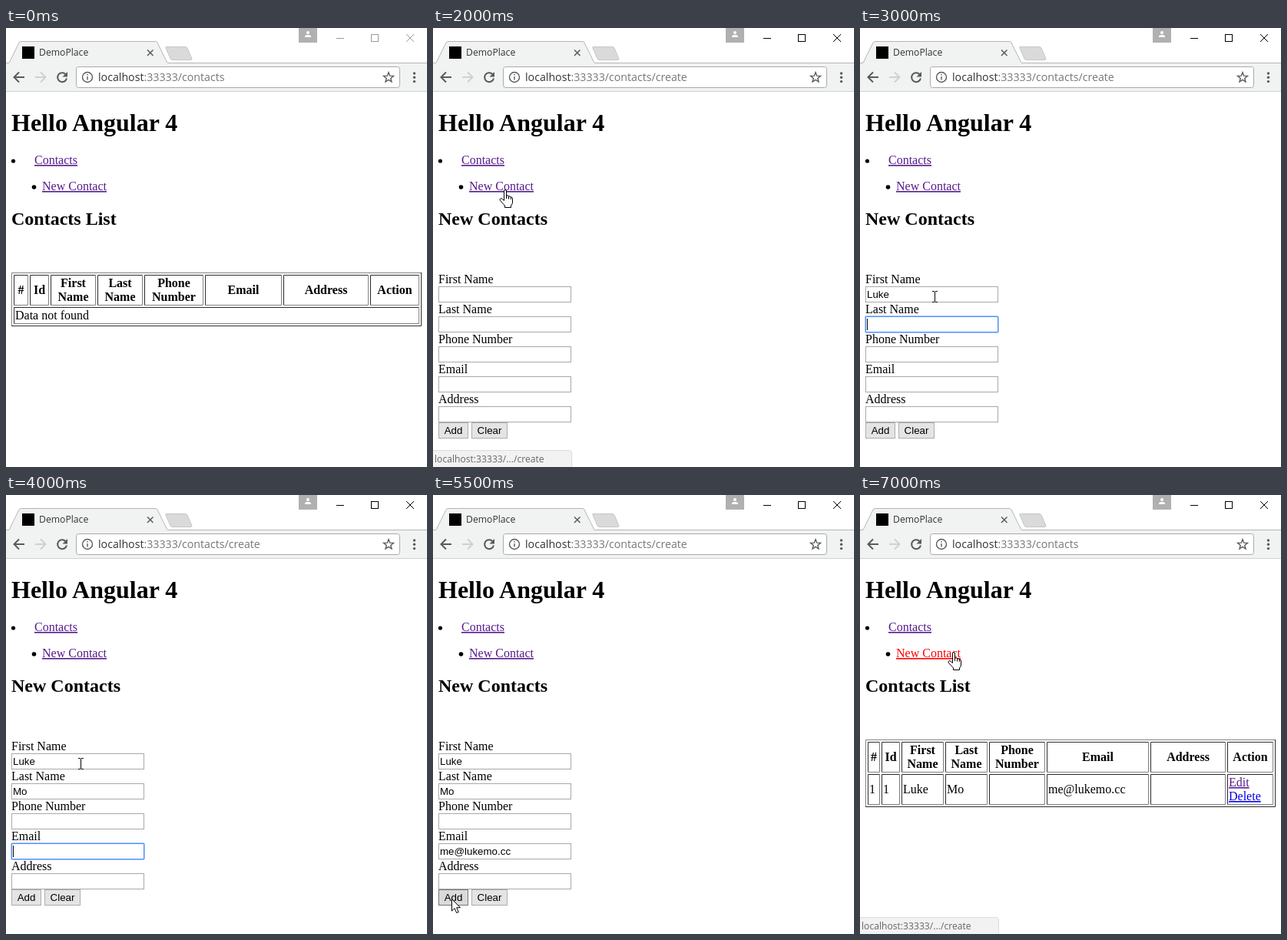
Recreate the animation shown at these times as an HTML page. Size 548 px wide and 571 px high, loop 8000 ms.

```html
<!DOCTYPE html>
<html lang="en">
<head>
<meta charset="utf-8">
<title>Contacts</title>
<style>
  html, body { margin: 0; width: 100%; height: 100%; overflow: hidden; background: #fff; }
  svg { display: block; }
  text { font: 16px "Liberation Serif", serif; white-space: pre; }
  .b { font-weight: bold; }
  .mid { text-anchor: middle; }
  .h1 { font-size: 32px; }
  .h2 { font-size: 24px; }
  .ui { font: 13.33px "Liberation Sans", sans-serif; }
  .bar { font: 14.2px "Open Sans", sans-serif; }
  .tab { font-size: 12.2px; }
  .link { text-decoration: underline; }
</style>
</head>
<body>
<svg id="stage" width="548" height="571" viewBox="0 0 548 571"></svg>
<script>
const VISITED = '#551a8b';
const COLS = ['#', 'Id', 'First Name', 'Last Name', 'Phone Number', 'Email', 'Address', 'Action'];
const LABELS = COLS.slice(2, 7);
const VALUES = ['Luke', 'Mo', '', 'me@lukemo.cc', ''];
const EMPTY_EDGES = [10, 31, 58, 119, 180, 259, 361, 474, 540];
const FILLED_EDGES = [10, 28, 54, 111, 168, 243, 378, 478, 540];
const STEPS = [0, 1000, 2000, 2500, 3000, 3500, 4000, 4500, 5000, 5500, 6000, 7000];
const LOOP = 8000;

const text = (x, y, s, cls = '', fill = '#000') =>
  `<text x="${x}" y="${y}" class="${cls}" fill="${fill}">${s}</text>`;
const rect = (x, y, w, h, fill, extra = '') =>
  `<rect x="${x}" y="${y}" width="${w}" height="${h}" fill="${fill}" ${extra}/>`;
const path = (d, stroke, width = 1, fill = 'none', extra = '') =>
  `<path d="${d}" stroke="${stroke}" stroke-width="${width}" fill="${fill}" ${extra}/>`;
const circle = (x, y, r, fill) => `<circle cx="${x}" cy="${y}" r="${r}" fill="${fill}"/>`;
const frame = (x, y, w, h, stroke, fill = 'none', r = 0) =>
  rect(x + .5, y + .5, w - 1, h - 1, fill, `stroke="${stroke}" rx="${r}"`);

// One-pixel box with different top-left and bottom-right edges
function bevel(x, y, r, b, light, dark) {
  return path(`M${x + .5} ${b}V${y + .5}H${r}`, light) +
         path(`M${r - .5} ${y}V${b - .5}H${x}`, dark);
}
const cell = (x, y, r, b) => bevel(x, y, r, b, '#2c2c2c', '#808080');

function star(cx, cy) {
  const pts = Array.from({ length: 10 }, (_, i) => {
    const a = i * Math.PI / 5, r = i % 2 ? 2.9 : 6.8;
    return [cx + r * Math.sin(a), cy - r * Math.cos(a)].map(v => v.toFixed(2)).join(' ');
  });
  return path(`M${pts.join('L')}Z`, '#5a5a5a', 1.4);
}

function browser(active, url, canForward) {
  const ctl = active ? '#000' : '#999';
  const icon = '#5a5a5a';
  return rect(0, 0, 548, 571, '#fff') +
    rect(381, 0, 24, 19, '#b0b0b0') + circle(393, 6, 2, '#fff') +
    path('M389 12v-1q0-2 4-2t4 2v1Z', 'none', 0, '#fff') +
    path('M430 13.5H440', ctl) + frame(475, 8, 10, 10, ctl) +
    path('M521 8L531 18M531 8L521 18', ctl) +
    rect(0, 46, 548, 36, '#f1f2f2') +
    path('M0 45.5H4L17 19Q18 17.5 20 17.5H194Q196 17.5 197 19L210 45.5H548', '#b4b6b6', 1, '#f1f2f2') +
    path('M5 46H210', '#f1f2f2', 2) +
    path('M0 82.5H548', '#cfd1d1') +
    path('M209 24.5H233Q235 24.5 236 26L242 40Q242 41.5 240 41.5H217Q215 41.5 214 40L208 26Q207 24.5 209 24.5Z', '#c6c6c6', 1, '#dadada') +
    rect(21, 24, 16, 16, '#000') +
    text(43, 36, 'DemoPlace', 'bar tab', '#333') +
    path('M184 28.5L191.5 36M191.5 28.5L184 36', icon, 1.5) +
    path('M24 64H11M17 57.5L10.5 64L17 70.5', icon, 2) +
    path('M38 64H51M45 57.5L51.5 64L45 70.5', '#d0d0d0', 2) +
    path('M77.5 60A6 6 0 1 0 79 65.5', icon, 2) +
    path('M80 57V63.5H73.5Z', 'none', 0, icon) +
    frame(91, 50, 422, 28, '#a9abab', '#fff', 3) +
    path('M99.5 64a6.5 6.5 0 1 0 13 0a6.5 6.5 0 1 0-13 0M106 63v4.5M106 60v1.6', icon, 1.4) +
    text(120, 69, `localhost<tspan fill="#777">:33333${url}</tspan>`, 'bar', '#333') +
    star(498, 64.5) +
    [59, 64.3, 69.6].map(y => circle(531.5, y, 1.7, icon)).join('');
}

function heading(title, hot) {
  return text(7, 134, 'Hello Angular 4', 'b h1') +
    circle(9.5, 173, 2.6, '#000') + text(37, 177, 'Contacts', 'link', VISITED) +
    circle(36.5, 207, 2.8, '#000') + text(47, 211, 'New Contact', 'link', hot ? '#f00' : VISITED) +
    text(7, 256, title, 'b h2');
}

function table(filled) {
  const edges = filled ? FILLED_EDGES : EMPTY_EDGES;
  const bottom = filled ? 403 : 385;
  let s = bevel(7, 318, 541, bottom + 3, '#808080', '#2c2c2c');
  COLS.forEach((name, i) => {
    const x = edges[i], r = edges[i + 1] - 2, words = name.split(' ');
    s += cell(x, 321, r + .0, 361);
    words.forEach((w, k) => {
      s += text((x + r) / 2, (words.length > 1 ? 337 : 346) + 18 * k, w, 'b mid');
    });
    if (filled) {
      s += cell(x, 363, r, 403) + text(x + 2, 388, ['1', '1', ...VALUES, ''][i]);
    }
  });
  return s + (filled
    ? text(480, 379, 'Edit', 'link', VISITED) + text(480, 397, 'Delete', 'link', '#00e')
    : cell(10, 363, 538, 385) + text(12, 379, 'Data not found'));
}

function button(x, w, label, pressed) {
  return frame(x, 513, w, 21, pressed ? '#777' : '#adadad', pressed ? '#dadada' : '#e4e4e4') +
    text(x + w / 2, 528, label, 'ui mid');
}

function form(focus, pressed) {
  let s = '';
  LABELS.forEach((label, i) => {
    const y = 336 + 39 * i;
    s += text(7, y - 4, label) + frame(7, y, 173, 21, '#a9a9a9', '#fff');
    if (i < focus) s += text(9, y + 15, VALUES[i], 'ui');
  });
  if (focus >= 0 && focus < 5) {
    const y = 336 + 39 * focus;
    s += frame(6, y - 1, 175, 23, '#a3c6fa', 'none', 2) +
      frame(7, y, 173, 21, '#4d90fe') + rect(9, y + 3, 1, 15, '#000');
  }
  return s + button(7, 39, 'Add', pressed) + button(50, 47, 'Clear');
}

const hand = (x, y) => path('M6.5 14.5V2Q6.5.5 8 .5T9.5 2V8Q12.5 7 12.5 9Q14.9 8.2 15.3 10Q17.5 9.6 17.5 12V17Q17.5 19 15.5 21V23.5H7.5V21L1.5 14.5Q.3 12.5 2 11.5Q3.5 11.2 6.5 14.5ZM9.5 8V12M12.5 9V12.5M15.3 10V13',
  '#000', 1, '#fff', `transform="translate(${x} ${y})"`);
const arrow = path('M.5 .5V16L4.1 12.6L6.7 18.5L9.3 17.4L6.7 11.7H11.5Z', '#000', 1, '#fff', 'transform="translate(24 525)"');
const beam = path('M94 342.5H97M98 342.5H101M97.5 343V356M94 356.5H97M98 356.5H101', '#000');
const status = path('M-1 549.5H177Q180.5 549.5 180.5 553V572H-1Z', '#dcdcdc', 1, '#f2f2f2') +
  text(2, 565, 'localhost:33333/.../create', 'bar" style="font-size:12.15px', '#666');

function scene(step) {
  const time = STEPS[step];
  const creating = time >= 2000 && time < 6000;
  let s = browser(time >= 2000, creating ? '/contacts/create' : '/contacts') +
    heading(creating ? 'New Contacts' : 'Contacts List', time === 7000);
  s += creating ? form((time - 2500) / 500, time === 5500) : table(time >= 6000);
  if (time === 2000 || time === 7000) s += status;
  if (time === 1000 || time === 2000) s += hand(86, 210);
  if (time === 7000) s += hand(114, 204);
  if (time >= 2500 && time < 5000) s += beam;
  if (time === 5000 || time === 5500) s += arrow;
  return s;
}

const stage = document.getElementById('stage');
const start = performance.now();
let shown = -1;
function draw() {
  const t = (performance.now() - start) % LOOP;
  const step = STEPS.filter(v => v <= t).length - 1;
  if (step !== shown) stage.innerHTML = scene(shown = step);
  requestAnimationFrame(draw);
}
draw();
</script>
</body>
</html>
```
